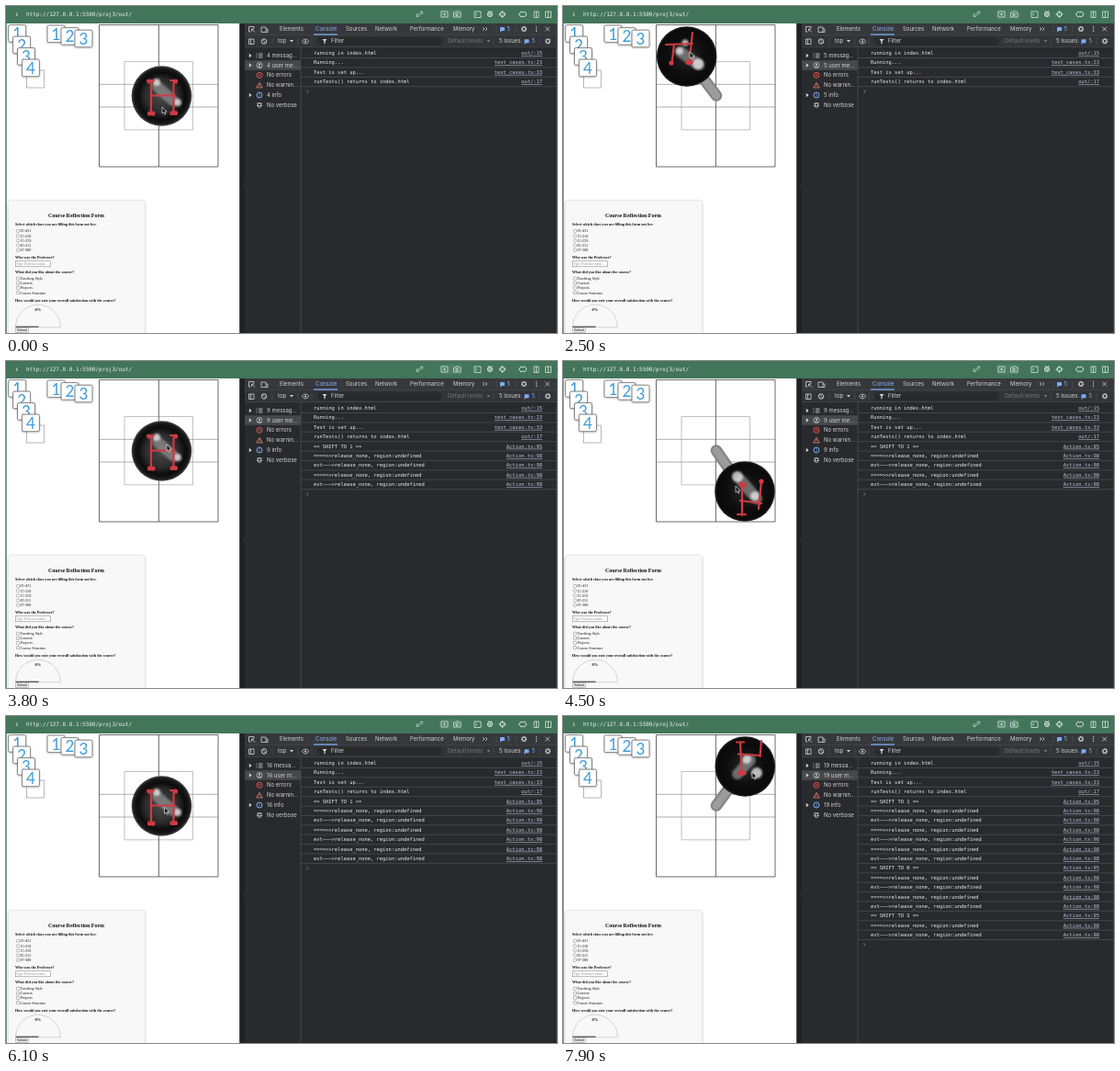
Animation of 600 by 356 pixels, one loop 8 s. Source, as an HTML page:

```html
<!DOCTYPE html>
<html lang="en">
<head>
<meta charset="utf-8">
<title>Gear shifter console</title>
<style>
html, body { margin: 0; width: 100%; height: 100%; overflow: hidden; background: #292a2d; }
svg { display: block; width: 600px; height: 356px; }
text { white-space: pre; }
</style>
</head>
<body>
<svg id="stage" viewBox="0 0 600 356" xmlns="http://www.w3.org/2000/svg"></svg>
<script>
const LOOP = 8000;
const MONO = "'DejaVu Sans Mono', monospace", SANS = "Inter, sans-serif";
const SERIF = "'Liberation Serif', serif", LATO = "Lato, sans-serif";
const GREEN = "#43755b", BLUE = "#7cacf8", GREY = "#d2d3d6", PANEL = "#292a2d", RED = "#cf3a43";

const text = (x, cy, s, size, font, fill, more = "") =>
  `<text x="${x}" y="${cy + size * .35}" font-size="${size}" font-family="${font}" fill="${fill}" ${more}>${s}</text>`;
const rect = (x, y, w, h, fill, stroke = "none", more = "") =>
  `<rect x="${x}" y="${y}" width="${w}" height="${h}" fill="${fill}" stroke="${stroke}" ${more}/>`;
const path = (d, stroke, width = .8, more = "") =>
  `<path d="${d}" fill="none" stroke="${stroke}" stroke-width="${width}" ${more}/>`;
const circle = (x, y, r, fill, stroke = "none", more = "") =>
  `<circle cx="${x}" cy="${y}" r="${r}" fill="${fill}" stroke="${stroke}" ${more}/>`;
const triangle = (x, y, fill, down) =>
  `<path d="${down ? `M${x - 2} ${y - 1}h4l-2 2.6z` : `M${x - 1.2} ${y - 2.2}v4.4l2.8-2.2z`}" fill="${fill}"/>`;
const gear = (x, y) => circle(x, y, 2.4, "none", GREY, 'stroke-width="1.4" stroke-dasharray="1.25 .63"') +
  circle(x, y, 1.8, "none", GREY, 'stroke-width=".7"');
const chat = (x, y) => rect(x - 2.5, y - 2.5, 5, 4, BLUE, "none", 'rx=".6"') +
  `<path d="M${x - 2.5} ${y + 1}v2l2-1.4z" fill="${BLUE}"/>`;

function browserBar() {
  const c = "#d5e6dc";
  return rect(0, 0, 600, 356, GREEN) +
    text(11, 9, "i", 6, SERIF, c, 'font-weight="bold"') +
    text(22, 9, "http://127.0.0.1:5500/proj3/out/", 5.97, MONO, "#eef5f0") +
    rect(472, 3.5, 25, 11, "#4d7f66", "none", 'rx="2"') +
    path("M449 10.5l2.5-3M448.5 8l-1.5 2q-.5 2 2 1.6l1-1M451 7l1-1q2-.5 1.8 1.5l-1.6 2", c) +
    path("M474 6h7v6h-7zM477.5 7.5v3M476 9h3M487.5 7h2l1-1.2h2l1 1.2h1.5v5h-7.5z", c) + circle(491, 9.3, 1.3, "none", c) +
    path("M510 6h7v6.5h-7zM511.5 8l1.5 1.2-1.5 1.2", c) +
    circle(527, 9, 2.6, "none", c) + path("M525 5l1 2M529 5l-1 2M524 9h6M527 7v5", c) +
    circle(540.5, 9, 2.6, "none", c) + path("M540.5 5v3M540.5 10v3M536.5 9h3M541.5 9h3", c) +
    path("M561 6l-2.5 3 2.5 3M564.5 6l2.5 3-2.5 3M561 6q1.7 2 3.5 0M561 12q1.7-2 3.5 0", c, 1) +
    path("M575 6h5v6.5h-5zM577.5 6v6.5", c) + path("M587.5 6h6v6.5h-6zM590.5 6v6.5", c);
}

const card = (x, y, n) =>
  rect(x, y, 19, 18.6, "#fff", "#666", 'rx="1.5" stroke-width=".8" filter="url(#soft)"') +
  text(x + 9.5, y + 9.6, n, 17, LATO, "#3a9bd9", 'text-anchor="middle"');

function form() {
  const say = (x, y, s, bold, size = 4.15) => text(x, y, s, size, SERIF, "#111", bold ? 'font-weight="bold"' : "");
  const box = 'stroke-width=".5"';
  return rect(2.5, 211.5, 149, 150, "#f8f8f8", "#ddd", 'rx="3" stroke-width=".5" filter="url(#soft)"') +
    text(76.5, 227.5, "Course Reflection Form", 5.95, SERIF, "#111", 'font-weight="bold" text-anchor="middle"') +
    say(10, 238, "Select which class you are filling this form out for:", true) +
    ["05-431", "15-210", "15-259", "85-211", "07-300"].map((s, i) =>
      circle(13, 245 + i * 5.2, 1.7, "#fff", "#777", box) + say(15.5, 245 + i * 5.2, s)).join("") +
    say(10, 273.5, "Who was the Professor?", true) +
    rect(10.3, 277.8, 38, 6, "#fff", "#777", box) +
    text(11.5, 281, "Type Professor name...", 3.7, SERIF, "#888") +
    say(10, 289.5, "What did you like about the course?", true) +
    ["Teaching Style", "Content", "Projects", "Course Structure"].map((s, i) =>
      rect(11.4, 295.2 + i * 5.1, 3.2, 3.2, "#fff", "#777", box + ' rx=".5"') + say(15.5, 296.8 + i * 5.1, s)).join("") +
    say(10, 320.5, "How would you rate your overall satisfaction with the course?", true) +
    path("M10.5 349.7a24.5 24.5 0 0 1 49 0z", "#bbb", .6) +
    path("M10.5 349.2h25", "#222", 1) + say(31.5, 330, "0%", true, 4.4) +
    rect(10.5, 350.3, 14, 5.2, "#eee", "#888", 'rx=".8" stroke-width=".5"') + say(12, 352.8, "Submit", false, 3.8);
}

function page() {
  return rect(.7, 19, 254, 337, "#fff") +
    rect(22.5, 70, 19, 19, "#fff", "#888", 'stroke-width=".6"') +
    [1, 2, 3, 4].map((n, i) => card(2.7 + i * 4.9, 20.6 + i * 12.5, n)).join("") +
    [1, 2, 3].map((n, i) => card(45 + i * 15, 21 + i * 2.6, n)).join("") +
    path("M101.5 85.3H231M101.5 110H231", "#777", .6) +
    path("M129 60.5h74.5v74.3H129z", "#999", .6) +
    path("M101.5 20.5H231V175H101.5zM166.4 20.5V175", "#444", .8) + form();
}

function devtools() {
  const ui = (x, y, s, fill = GREY, more) => text(x, y, s, 6, SANS, fill, more);
  const tabs = [[298, "Elements"], [337, "Console"], [370, "Sources"], [402, "Network"], [440, "Performance"], [487, "Memory"]];
  return rect(254.5, 19, 345.1, 337, PANEL) + rect(254.5, 19, 5.5, 337, "#202124") +
    text(256.5, 195, "⋮", 5, MONO, "#888") +
    rect(260, 19, 339.6, 12.5, "#37383b") + rect(260, 32, 339.6, 12.5, "#333437") +
    path("M260 31.7H599.6M260 44.7H599.6", "#505257", .6) +
    tabs.map(([x, s]) => ui(x, 25, s, s == "Console" ? "#8ab4f8" : GREY)).join("") +
    rect(335, 30.4, 26, 1.3, BLUE) +
    path("M264.5 22.5h5.5v2M264.5 22.5v5.5h2M267.5 25l3.5 3.5M267.5 27.5v-2.5h2.5M278 23h5v5.5h-5zM283 25h2v3.5h-2", GREY) +
    path("M519 23l2 2-2 2M522 23l2 2-2 2", GREY) + chat(540.5, 25.5) + ui(545.5, 25, "5", BLUE) +
    path("M534 22v7M555 22v7M318 35v7M333 35v7M531 35v7M581 35v7M290 35v7", "#5a5a5a", .6) +
    gear(564, 25) + [22.6, 25, 27.4].map(y => circle(577.5, y, .7, GREY)).join("") +
    path("M587.3 22.8l4.6 4.6M591.9 22.8l-4.6 4.6", GREY) +
    path("M264.5 36h5.5v5.5h-5.5zM266.5 36v5.5", GREY) + circle(281, 38.5, 2.7, "none", GREY) + path("M279.2 36.6l3.7 3.7", GREY) +
    ui(296, 38.3, "top") + triangle(311, 38, GREY, true) +
    path("M322.3 38.5q3.8-5 7.6 0q-3.8 5-7.6 0z", GREY) + circle(326.1, 38.5, 1.1, GREY) +
    rect(339, 33.7, 136, 9.4, PANEL, "none", 'rx="4.5"') +
    `<path d="M344.5 36h5l-1.9 2.6v2.6h-1.2v-2.6z" fill="${GREY}"/>` + ui(354, 38.3, "Filter") +
    ui(481, 38.3, "Default levels", "#777") + triangle(525.5, 38, "#777", true) +
    ui(537, 38.3, "5 Issues:") + chat(567, 38.8) + ui(572.5, 38.3, "5", BLUE) + gear(590, 38.3) +
    rect(260, 59.2, 61, 10.6, "#47484b") +
    [54, 64.5, 97].map(y => triangle(266, y, GREY)).join("") +
    path("M275 52h4.5M275 54h4.5M275 56h4.5M272.5 52h1M272.5 54h1M272.5 56h1", GREY) +
    circle(276, 64.5, 3, "none", GREY, 'stroke-width=".7"') + circle(276, 63.7, 1, GREY) + path("M274 66.8q2-2 4 0", GREY) +
    circle(276, 75.3, 3, "none", "#e8504a") + path("M274.8 74.1l2.4 2.4M277.2 74.1l-2.4 2.4", "#e8504a") +
    path("M276 83.3l3.2 5.6h-6.4zM276 85.3v1.8", "#f08a70") +
    circle(276, 97, 3, "none", BLUE) + path("M276 96.5v2M276 95v.8", BLUE) +
    `<ellipse cx="276" cy="108" rx="1.9" ry="2.6" fill="none" stroke="${GREY}" stroke-width=".8"/>` +
    path("M272.8 106h6.4M272.8 108.5h6.4", GREY, .6) +
    ui(284, 54, "", GREY, 'id="messages"') + ui(284, 64.5, "", GREY, 'id="users"') + ui(284, 75.3, "No errors") +
    ui(284, 86.3, "No warnin...") + ui(284, 97, "", GREY, 'id="info"') + ui(284, 108, "No verbose") +
    path("M321 45V356", "#505257", .7);
}

const PITCH = 10.39;
const pair = [["====&gt;&gt;release_none, region:undefined", "Action.ts:98"], ["evt———&gt;release_none, region:undefined", "Action.ts:98"]];
const shift = gear => ["== SHIFT TO " + gear + " ==", "Action.ts:95"];
const log = [
  ["running in index.html", "out/:15"], ["Running...", "test_cases.ts:23"],
  ["Test is set up...", "test_cases.ts:33"], ["runTests() returns to index.html", "out/:17"],
  shift(1), ...pair, ...pair, ...pair, shift("N"), ...pair, ...pair, shift(3), ...pair
];
const logRows = () => log.map(([message, link], i) => {
  const y = 51.2 + i * PITCH;
  return `<g class="row">` + text(335, y, message, 5.43, MONO, "#e8eaed") +
    text(584, y, link, 5.43, MONO, "#b9c4db", 'text-anchor="end" text-decoration="underline"') +
    path(`M321 ${y + 5.3}H599.6`, "#505257", .7) + "</g>";
}).join("");

// Each pose: knob centre, red gate lines, red end balls, glossy band, highlights [x, y, r]
const poses = {
  N: { at: [169.5, 98], gate: "M158 82V116M182.5 82V116M158 97.5H182.5M154 81h7M179 81h7", balls: [[156.5, 117], [160, 117], [181, 116.5], [184.5, 116.5], [156, 82], [184.5, 82]],
    band: "M165 88L182 103", shine: [[164, 83, 4], [187, 105, 4]] },
  1: { at: [134.7, 55], gate: "M121 42L118.5 62M141 29L137.5 61M112 42L141 41", balls: [[118, 62], [136, 61.5], [139, 61.5]],
    band: "M128 50L148 64", shine: [[127, 49, 4], [133, 40, 3.5], [147, 63, 6]] },
  4: { at: [198, 142], gate: "M195 134V168M216 131L213 161M193 152L216 155M190 167h9", balls: [[194, 134], [197, 135], [216, 131]],
    band: "M194 130L211 150", shine: [[190, 126, 6], [209, 147, 5]] },
  3: { at: [198.3, 55], gate: "M193 29L194.5 62M216 27L214.5 44M191 41.5L215 43M189 28.5h8", balls: [[192.5, 62], [197, 62]],
    band: "M190 63L204 48", shine: [[211, 62, 6], [200, 47, 5]] }
};

function knob(name) {
  const { at: [x, y], gate, balls, band, shine } = poses[name];
  const stick = name == "N" ? "" :
    path(`M167 97.5L${x} ${y}`, "#858585", 12.6, 'stroke-linecap="round"') +
    path(`M167 97.5L${x} ${y}`, "#9c9c9c", 8, 'stroke-linecap="round"');
  return `<g class="knob" id="knob${name}">` + stick +
    circle(x, y, 32.8, `url(#${name == "N" ? "top" : "side"})`) +
    path(band, "#999", 12, 'stroke-linecap="round" opacity=".65" filter="url(#blur)"') +
    shine.map(([a, b, r]) => circle(a, b, r, "#e4e4e4", "none", 'opacity=".8" filter="url(#blur)"')).join("") +
    path(gate, RED, 2.2, 'stroke-linecap="round"') +
    balls.map(([a, b]) => circle(a, b, 2.6, RED)).join("") + "</g>";
}

const gradient = (id, stops) => `<radialGradient id="${id}">` +
  stops.map(([o, c]) => `<stop offset="${o}" stop-color="${c}"/>`).join("") + "</radialGradient>";

document.getElementById("stage").innerHTML = "<defs>" +
  gradient("top", [[0, "#4a4a4a"], [.55, "#2b2b2b"], [.78, "#0c0c0c"], [.92, "#181818"], [1, "#4a4a4a"]]) +
  gradient("side", [[0, "#262626"], [.6, "#0e0e0e"], [.92, "#0a0a0a"], [1, "#222"]]) +
  `<filter id="blur" x="-50%" y="-50%" width="200%" height="200%"><feGaussianBlur stdDeviation=".8"/></filter>
   <filter id="soft"><feDropShadow dx="0" dy=".8" stdDeviation="1" flood-opacity=".25"/></filter></defs>` +
  browserBar() + page() + Object.keys(poses).map(knob).join("") + devtools() + logRows() +
  path("M327.4 .4l1.7 1.8-1.7 1.8", "#8a8d93", .7, 'id="prompt"') +
  `<path id="cursor" d="M0 0v7l1.6-1.4 1.1 2.5 1.3-.6-1.1-2.4h2.2z" fill="#111" stroke="#fff" stroke-width=".6"/>`;

const $ = id => document.getElementById(id);
const rows = [...document.querySelectorAll(".row")], knobs = [...document.querySelectorAll(".knob")];

const gears = [[0, "N"], [2350, 1], [3400, "N"], [4150, 4], [5850, "N"], [6450, 3]];
const counts = [[0, 4], [2450, 5], [2550, 9], [5000, 11], [6100, 16], [7150, 19]];
const moves = [[0, 170, 110], [500, 170, 110], [1300, 128, 41], [1500, 128, 41], [1950, 168, 92], [2400, 138, 50],
  [2900, 138, 50], [3500, 175, 91], [3800, 175, 91], [4350, 188, 136], [5700, 188, 136], [6150, 172, 98],
  [6600, 187, 77], [6800, 187, 77], [7700, 206, 61], [8000, 206, 61]];

const stepAt = (steps, t) => steps.filter(s => s[0] <= t).pop()[1];

function cursorAt(t) {
  const i = moves.findIndex(m => m[0] > t), [t0, x0, y0] = moves[i - 1], [t1, x1, y1] = moves[i];
  const p = (t - t0) / (t1 - t0), e = p * p * (3 - 2 * p);
  return [x0 + (x1 - x0) * e, y0 + (y1 - y0) * e];
}

function draw(now) {
  // The console list trails the sidebar counters slightly
  const t = now % LOOP, n = stepAt(counts, t), lines = stepAt(counts, Math.max(0, t - 100));
  $("messages").textContent = `${n} messages`.slice(0, 8) + "...";
  $("users").textContent = `${n} user messages`.slice(0, 9) + "...";
  $("info").textContent = n + " info";
  rows.forEach((row, i) => row.style.display = i < lines ? "" : "none");
  $("prompt").setAttribute("transform", `translate(0 ${49.3 + lines * PITCH})`);
  const gear = "knob" + stepAt(gears, t);
  knobs.forEach(k => k.style.display = k.id == gear ? "" : "none");
  $("cursor").setAttribute("transform", `translate(${cursorAt(t)})`);
  requestAnimationFrame(draw);
}
requestAnimationFrame(draw);
</script>
</body>
</html>
```
